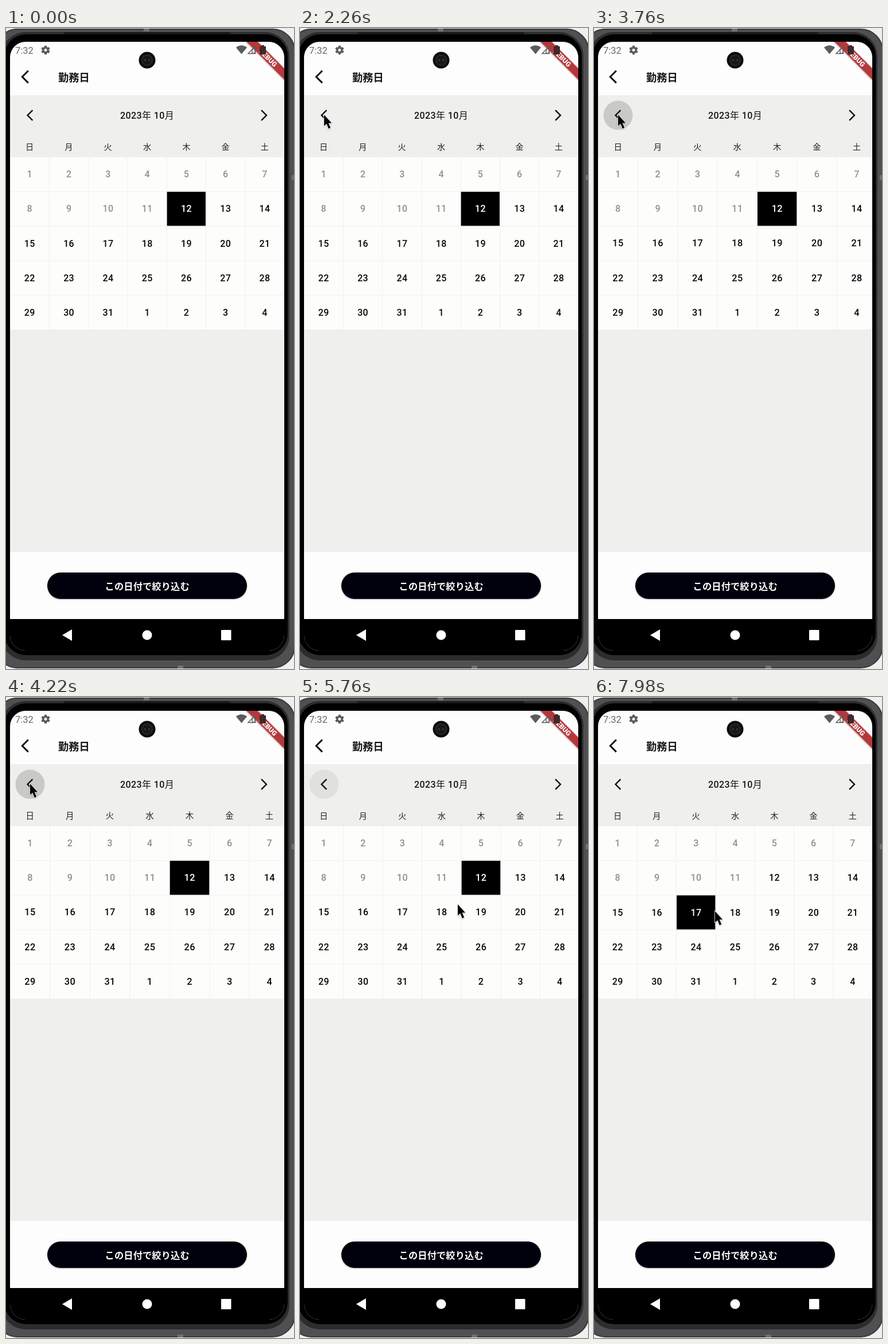
An HTML page that plays this animation: 502x1116 px, repeating every 8000 ms.

```html
<!DOCTYPE html>
<html lang="ja">
<head>
<meta charset="utf-8">
<title>勤務日</title>
<style>
  html, body { margin: 0; width: 100%; height: 100%; overflow: hidden; background: #efefef; }
  svg { display: block; width: 502px; height: 1116px; }
  text { font-family: Roboto, "Noto Sans CJK JP", "Noto Sans CJK", sans-serif; }
  .mid { text-anchor: middle; }
  .num { font-size: 16px; font-weight: 500; letter-spacing: .4px; }
</style>
</head>
<body>
<svg viewBox="0 0 502 1116" xmlns="http://www.w3.org/2000/svg">
  <defs>
    <clipPath id="screen"><rect x="7" y="24" width="478" height="1060" rx="27"/></clipPath>
    <clipPath id="page"><rect x="7" y="185" width="478" height="345"/></clipPath>
    <path id="chevron" d="M5.900 -8.230L4.130 -10L-5.870 0L4.130 10L5.900 8.230L-2.330 0Z" fill="#111"/>
    <filter id="soft" x="-30%" y="-30%" width="160%" height="160%">
      <feDropShadow dx="0" dy="1" stdDeviation="1.2" flood-opacity=".3"/>
    </filter>
  </defs>

  <!-- phone body -->
  <rect x="-18" y="2" width="521" height="1112" rx="38" fill="#505052" stroke="#38383a" stroke-width="2"/>
  <rect x="-8" y="7" width="502" height="1094" rx="42" fill="#2c2c2c"/>
  <rect x="-3" y="11" width="494" height="1081" rx="38"/>
  <path d="M103 9H389" stroke="#191919" stroke-width="4" stroke-linecap="round"/>
  <path d="M240 1h10v5h-10zM299 1110h10v5h-10zM498 256h4v9h-4z" fill="#707072"/>

  <g clip-path="url(#screen)">
    <rect x="7" y="24" width="478" height="1060" fill="#fdfdfd"/>
    <rect x="7" y="117" width="478" height="795" fill="#efefee"/>
    <use href="#chevron" transform="translate(33 85) scale(1.163)"/>
    <text x="91" y="93" font-size="18.200" font-weight="700" fill="#151515">勤務日</text>

    <circle id="ripple" cx="42" cy="152"/>
    <use href="#chevron" transform="translate(41.500 152) scale(.97)"/>
    <use href="#chevron" transform="translate(450 152) scale(-.97)"/>
    <text class="mid num" x="246.200" y="158" fill="#151515">2023年 10月</text>

    <g clip-path="url(#page)"><g id="calendar"></g></g>

    <rect x="72" y="948" width="348" height="46" rx="23" fill="#020008" filter="url(#soft)"/>
    <text class="mid" x="246.200" y="978" font-size="16.250" letter-spacing=".1" font-weight="700" fill="#fff">この日付で絞り込む</text>

    <rect x="7" y="1029" width="478" height="55"/>
    <path d="M98 1057L115 1047V1067Z" fill="#fff"/>
    <circle cx="246" cy="1057" r="8.500" fill="#fff"/>
    <rect x="375" y="1048" width="17.500" height="18" rx="1" fill="#fff"/>

    <!-- debug ribbon and status icons -->
    <g transform="translate(485 24) rotate(45)">
      <rect x="-50" y="32.600" width="100" height="14" fill="#b5373b" filter="url(#soft)"/>
      <text class="mid" y="43.800" font-size="11.900" font-weight="900" fill="#fff">DEBUG</text>
    </g>
    <text x="16" y="45" font-size="16.500" fill="#686868">7:32</text>
    <g fill="#5b5b5b">
      <circle cx="69" cy="38.500" r="4.200" fill="none" stroke="#5b5b5b" stroke-width="3.400"/>
      <g id="teeth"></g>
      <path d="M401 34Q410.500 26.500 420 34L410.500 45.500Z"/>
      <path d="M422 44.500H434.500V31.500ZM429 44V38L434 32V44Z" stroke="#5b5b5b" stroke-width="1.400" fill="none"/>
      <path fill="#40282a" d="M442 32H445V30H450V32H453V46H442Z"/>
    </g>
  </g>

  <!-- camera -->
  <circle cx="246" cy="56" r="14.500" fill="#0c0c0c"/>
  <circle cx="246" cy="56" r="9" fill="#171717" stroke="#292929" stroke-width="2"/>
  <circle cx="242.500" cy="56" r="1.600" fill="#463f38"/>
  <circle cx="249.500" cy="56" r="1.600" fill="#463f38"/>

  <path id="cursor" d="M0 0V19.500L4.300 15.700L7.800 24.300L11.200 22.800L7.700 14.600H13.200Z" stroke="#fff" stroke-width="1.400"
        paint-order="stroke" filter="url(#soft)"/>
</svg>
<script>
const LOOP = 8000, LEFT = 7, COL = 478 / 7, TOP = 224.5, ROW = 60.2, GAP = .5;
const $ = id => document.getElementById(id);
const calendar = $('calendar'), ripple = $('ripple'), cursor = $('cursor');

function add(parent, tag, attrs, text = '') {
  const el = document.createElementNS('http://www.w3.org/2000/svg', tag);
  for (const key in attrs) el.setAttribute(key, attrs[key]);
  el.textContent = text;
  return parent.appendChild(el);
}

for (let i = 0; i < 6; i++)
  add($('teeth'), 'rect', { x: 67, y: 30.8, width: 4, height: 4, transform: `rotate(${i * 60} 69 38.5)` });

[...'日月火水木金土'].forEach((day, i) =>
  add(calendar, 'text', { class: 'mid', x: LEFT + (i + .5) * COL, y: 212, 'font-size': 14.2, fill: '#222' }, day));

add(calendar, 'rect', { x: LEFT, y: TOP, width: 7 * COL, height: 5 * ROW, fill: '#f0f0f3' });
const cells = Array.from({ length: 35 }, (_, i) => {
  const x = LEFT + i % 7 * COL, y = TOP + Math.floor(i / 7) * ROW;
  const box = add(calendar, 'rect', { x: x + GAP, y: y + GAP, width: COL - 2 * GAP, height: ROW - 2 * GAP });
  const label = add(calendar, 'text', { class: 'mid num', x: x + COL / 2 + .2, y: y + 35.6 }, i % 31 + 1);
  return { box, label };
});

function select(day) {
  cells.forEach(({ box, label }, i) => {
    const on = i + 1 === day;
    box.setAttribute('fill', on ? '#000' : '#fdfdfc');
    label.setAttribute('fill', on ? '#fff' : i < 11 ? '#909090' : '#080808');
  });
}

const TAPS = [2600, 3070, 3550, 4026, 4390, 4743, 5336];
const PICK = 6900;
const PATH = [
  { t: 1560, x: 300, y: 560 },
  { t: 2080, x: 42, y: 151 },
  { t: 5420, x: 42, y: 151 },
  { t: 5760, x: 275, y: 361 },
  { t: 6500, x: 190, y: 374 },
  { t: 7500, x: 190, y: 374 },
  { t: 7800, x: 211, y: 373 }
];

const clamp = v => Math.max(0, Math.min(1, v));
const smooth = k => k * k * (3 - 2 * k);
const strongest = (pulse, t) => Math.max(...TAPS.map(tap => pulse(t - tap)));

// Overscroll: quick pull, then a slow release
const pull = dt => .019 * smooth(clamp(dt / 150)) * Math.exp(-Math.max(0, dt - 150) / 170);
// Button highlight: in over 75 ms, out between 300 and 500 ms
const glow = dt => .16 * Math.min(clamp(dt / 75), clamp((500 - dt) / 200));

function pointerAt(t) {
  const next = PATH.findIndex(p => p.t > t);
  if (next < 1) return PATH.at(next);
  const a = PATH[next - 1], b = PATH[next];
  const k = smooth((t - a.t) / (b.t - a.t));
  return { x: a.x + (b.x - a.x) * k, y: a.y + (b.y - a.y) * k };
}

// Playback advances in bursts of 18 steps with a short hold after each
function stepTime(t) {
  const phase = (t + 20) % 840;
  return Math.max(0, t - phase + Math.min(17, Math.floor(phase / 43.5)) * 43.5);
}

let chosen;
function draw(t) {
  const day = t < PICK ? 12 : 17;
  if (day !== chosen) select(chosen = day);
  const grow = strongest(pull, t);
  calendar.setAttribute('transform', `translate(${-LEFT * grow} 0) scale(${1 + grow} 1)`);
  ripple.setAttribute('fill-opacity', strongest(glow, t));
  ripple.setAttribute('r', 25.5 * clamp(.3 + (t - TAPS[0]) / 250));
  const { x, y } = pointerAt(t);
  cursor.setAttribute('transform', `translate(${x} ${y})`);
  cursor.setAttribute('visibility', t < PATH[0].t ? 'hidden' : 'visible');
}

const start = performance.now();
function tick() {
  draw(stepTime((performance.now() - start) % LOOP));
  requestAnimationFrame(tick);
}
tick();
</script>
</body>
</html>
```
